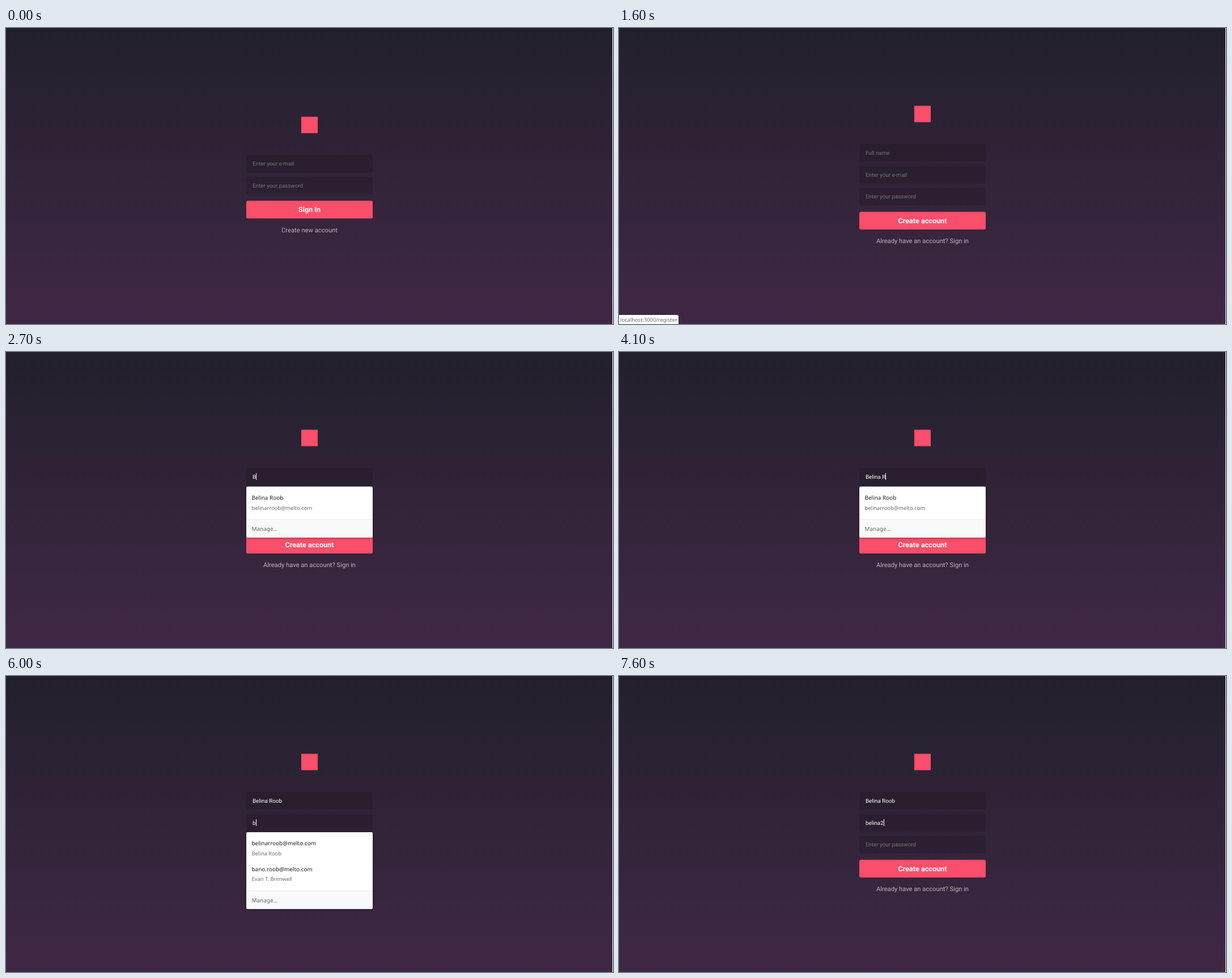
An HTML page that plays this animation: 1071x523 px, repeating every 8 s.

```html
<!DOCTYPE html>
<html lang="en">
<head>
<meta charset="utf-8">
<title>Sign up form</title>
<style>
  html, body { margin: 0; width: 100%; height: 100%; overflow: hidden; background: #22202c; }
  svg { display: block; width: 100%; height: 100%; }
  text { font-family: Roboto, sans-serif; font-size: 9.8px; text-rendering: geometricPrecision; white-space: pre; }
  .field { fill: #000; fill-opacity: .14; }
  .hint { fill: #757575; }
  .value, .caret { fill: #fff; }
  .accent { fill: #fb4e6a; }
  .action { fill: #fff; font-size: 12.6px; font-weight: 700; text-anchor: middle; }
  .link { fill: #fff; font-size: 11.2px; text-anchor: middle; }
  .popup { filter: drop-shadow(0 1px 2px rgba(0, 0, 0, .35)); }
  .popup text, .status text { font-family: "Noto Sans", sans-serif; }
  .popup .main { font-size: 9.95px; fill: #202124; }
  .popup .sub { font-size: 9.35px; fill: #6a6b6e; }
  .popup .manage { font-size: 9.95px; fill: #66686c; }
  .status text { font-size: 9.33px; fill: #6a6b6e; }
</style>
</head>
<body>
<svg id="stage" viewBox="0 0 1071 523" xmlns="http://www.w3.org/2000/svg">
  <defs>
    <linearGradient id="dusk" x1="0" y1="0" x2="0" y2="1">
      <stop offset="0" stop-color="#22202c"/>
      <stop offset="1" stop-color="#402845"/>
    </linearGradient>
  </defs>
  <rect width="1071" height="523" fill="url(#dusk)"/>
  <rect x="1070" width="1" height="523" fill="#fff"/>
</svg>
<script>
const LOOP = 8000;
const LEFT = 424, WIDTH = 223, MID = 535.5;
const FIRST = 220.4, PITCH = 38.8, SHIFT = 19.4;
const stage = document.getElementById("stage");

const user = { name: "Belina Roob", mail: "belinarroob@melto.com" };
const other = { name: "Evan T. Brimwell", mail: "bano.roob@melto.com" };
const typedMail = "belina2";

// One time per typed character
const nameKeys = [2700, 3000, 3400, 3700, 3800, 3900, 3900, 4100, 4300, 4400, 4500];
const mailKeys = [6000, 6100, 6400, 6600, 6600, 6700, 7500];

function add(parent, tag, attrs, content) {
  const node = document.createElementNS("http://www.w3.org/2000/svg", tag);
  for (const key in attrs) node.setAttribute(key, attrs[key]);
  if (content) node.textContent = content;
  parent.appendChild(node);
  return node;
}
const group = (parent, cls) => add(parent, "g", { class: cls });
const label = (parent, cls, x, y, content) => add(parent, "text", { class: cls, x, y }, content);
const show = (node, on) => node.setAttribute("display", on ? "inline" : "none");
const within = (t, from, to) => t >= from && t < to;
const typed = (content, keys, t) => content.slice(0, keys.filter(k => k <= t).length);

function addField(parent, center, hint) {
  add(parent, "rect", { class: "field", x: LEFT, y: center - 15.5, width: WIDTH, height: 31, rx: 2.8 });
  const hintText = label(parent, "hint", 435, center + 3.4, hint);
  const valueText = label(parent, "value", 435, center + 3.4);
  const caret = add(parent, "rect", { class: "caret", y: Math.round(center - 6.2), width: 1, height: 12 });
  show(caret, false);
  return (value, caretOn) => {
    valueText.textContent = value;
    show(hintText, !value);
    show(caret, caretOn);
    const length = value ? valueText.getComputedTextLength() : 0;
    caret.setAttribute("x", Math.round(435 + length));
  };
}

function addForm(top, hints, action, linkText) {
  const root = group(stage, "form");
  const end = top + PITCH * (hints.length - 1);
  add(root, "rect", { class: "accent", x: 521, y: top - 83, width: 29, height: 29 });
  const fields = hints.map((hint, i) => addField(root, top + PITCH * i, hint));
  add(root, "rect", { class: "accent", x: LEFT, y: end + 26.7, width: WIDTH, height: 31.3, rx: 2.8 });
  label(root, "action", MID, end + 46.6, action);
  const link = label(root, "link", MID, end + 82.4, linkText);
  link.setAttribute("fill-opacity", .66);
  return { root, fields, link };
}

function addPopup(top, rows) {
  const root = group(stage, "popup");
  const extra = 45.6 * (rows.length - 1);
  const height = 90 + extra;
  add(root, "rect", { x: LEFT, y: top, width: WIDTH, height, rx: 2, fill: "#fff" });
  const foot = top + 58 + extra;
  add(root, "path", {
    d: `M${LEFT} ${foot}h${WIDTH}v30q0 2 -2 2h${4 - WIDTH}q-2 0 -2 -2z`, fill: "#f8f9fa"
  });
  add(root, "rect", { x: LEFT, y: foot - .4, width: WIDTH, height: .7, fill: "#e4e5e8" });
  rows.forEach(([main, sub], i) => {
    label(root, "main", 433.5, top + 22.9 + 45.6 * i, main);
    label(root, "sub", 433.5, top + 40.8 + 45.6 * i, sub);
  });
  label(root, "manage", 433.5, top + 78.5 + extra, "Manage...");
  const cy = top + height / 2;
  return (opacity, scale = 1) => {
    show(root, opacity > 0);
    root.setAttribute("opacity", opacity);
    root.setAttribute("transform", `translate(${MID} ${cy}) scale(${scale}) translate(${-MID} ${-cy})`);
  };
}

const signIn = addForm(FIRST + SHIFT, ["Enter your e-mail", "Enter your password"],
  "Sign In", "Create new account");
const signUp = addForm(FIRST, ["Full name", "Enter your e-mail", "Enter your password"],
  "Create account", "Already have an account? Sign in");

const namePair = p => [p.name, p.mail];
const mailPair = p => [p.mail, p.name];
const allNames = addPopup(237.8, [namePair(user), namePair(other)]);
const oneName = addPopup(237.8, [namePair(user)]);
const allMails = addPopup(276, [mailPair(user), mailPair(other)]);
const oneMail = addPopup(276, [mailPair(user)]);

const status = group(stage, "status");
add(status, "path", { d: "M0 507h102q3 0 3 3v13h-105z", fill: "#fff" });
label(status, "", 2, 519.3, "localhost:3000/register");

function statusOpacity(t) {
  if (t < 1000 || t >= 2000) return 0;
  if (t < 1100) return .5;
  if (t < 1700) return 1;
  return 1 - (Math.floor((t - 1700) / 100) + 1) / 4;
}

function draw(t) {
  show(signIn.root, t < 1400);
  show(signUp.root, t >= 1400);
  signIn.link.setAttribute("fill-opacity", t < 700 ? .66 : 1);
  status.setAttribute("opacity", statusOpacity(t));

  signUp.fields[0](typed(user.name, nameKeys, t), within(t, 2400, 4700));
  signUp.fields[1](typed(typedMail, mailKeys, t),
    within(t, 4700, 5300) || within(t, 6000, 7300) || t >= 7500);

  allNames(within(t, 2400, 2700) ? 1 : 0);
  if (within(t, 4700, 4800)) oneName(.85, .99);
  else if (within(t, 4800, 4900)) oneName(.44, .968);
  else oneName(within(t, 2700, 4700) ? 1 : 0);

  allMails(within(t, 6000, 6100) ? 1 : 0);
  if (within(t, 7500, 7600)) oneMail(.44, .968);
  else oneMail(within(t, 6100, 7500) ? 1 : 0);
}

const start = performance.now();
function tick() {
  draw((performance.now() - start) % LOOP);
  requestAnimationFrame(tick);
}
tick();
</script>
</body>
</html>
```
